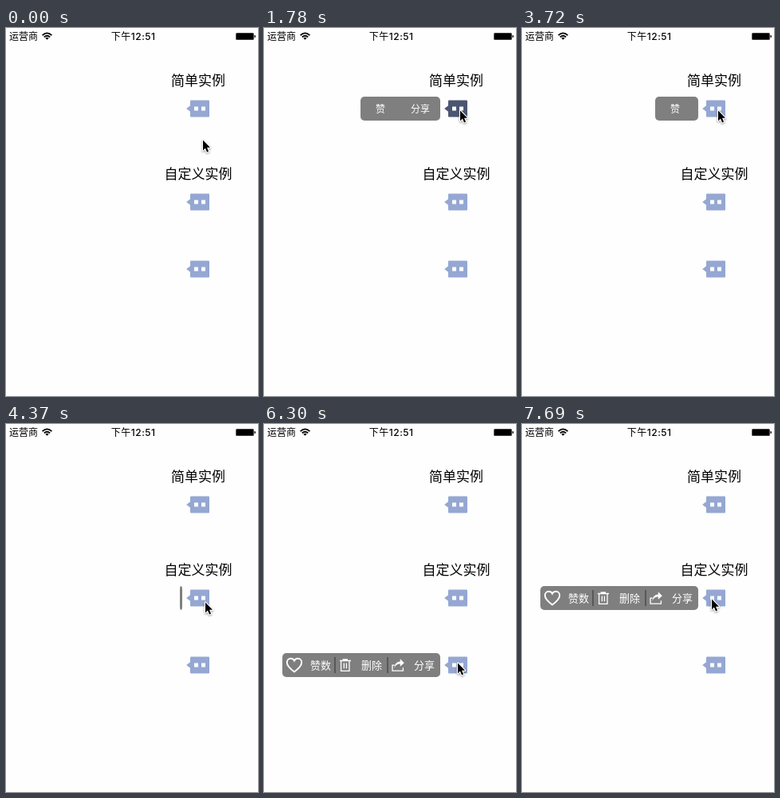
An HTML page for the animation above (7.99 s loop, 316 by 461 pixels).

```html
<!DOCTYPE html>
<html lang="zh-CN">
<head>
<meta charset="utf-8">
<title>弹出菜单</title>
<style>
  html, body { margin: 0; width: 100%; height: 100%; overflow: hidden; background: #fefefe; }
  body { position: relative; font-family: Inter, "Noto Sans CJK SC", "Noto Sans CJK", sans-serif; }
  svg { position: absolute; left: 0; top: 0; display: block; }
  text { text-anchor: middle; }
  .title { font-size: 17px; }
  .status { font-size: 12px; }
  .bubble { fill: #95a7d2; }
  .bubble.pressed { fill: #4b5672; }
  .menu {
    position: absolute; right: calc(100% - 221px); width: 0; height: 30px;
    overflow: hidden; background: #7f7f7f; border-radius: min(50%, 5px) / 5px;
  }
  .small, .large { fill: #fff; }
  .small { font-size: 12px; font-weight: 500; }
  .large { font-size: 13px; }
  .icon { fill: none; stroke: #fff; stroke-width: 1.3; }
  .heart { stroke-width: 1.9; }
  .solid { fill: #fff; }
  .divider { stroke: #484848; stroke-width: 1.4; }
  #cursor {
    stroke: #fff; stroke-width: 2.4; stroke-linejoin: round; paint-order: stroke;
    filter: drop-shadow(0 1px 1px rgba(0, 0, 0, .4));
  }
</style>
</head>
<body>
<svg width="316" height="461">
  <defs>
    <g id="bubble">
      <path d="M-14.8 0L-10 -3.8V3.8Z"/>
      <rect x="-10" y="-10.5" width="24" height="21" rx="1"/>
      <path fill="#fff" d="M-5 -2.5h5v5h-5zM4 -2.5h5v5h-5z"/>
    </g>
    <g id="actions">
      <path class="icon heart" d="M15 23.5C9 19 5.8 16 5.8 11.8C5.8 8.6 8 6.8 10.4 6.8C12.6 6.8 14.2 8 15 9.6C15.8 8 17.4 6.8 19.6 6.8C22 6.8 24.2 8.6 24.2 11.8C24.2 16 21 19 15 23.5Z"/>
      <text class="large" x="48" y="20">赞数</text>
      <path class="divider" d="M66 5V25M132 5V25"/>
      <path class="icon" d="M72 9.5H86M76.3 9.3V8H81.3V9.3M73.6 9.8V22.3H84V9.8M77.3 12.5V19.3M80.4 12.5V19.3"/>
      <text class="large" x="112" y="20">删除</text>
      <path class="icon" d="M140.8 15.2H138V22.2H151.4V18.2"/>
      <path class="solid" d="M140.5 18.7C141 13 144 10.8 147.8 10.6V7.3L152.8 12.2L147.8 16.8V13.6C144.5 13.4 142 15 140.5 18.7Z"/>
      <text class="large" x="178" y="20">分享</text>
    </g>
  </defs>

  <g class="status">
    <text x="22" y="14.5">运营商</text>
    <text x="159.7" y="14.5" font-weight="500" letter-spacing=".5">下午12:51</text>
  </g>
  <g fill="none" stroke="#000" stroke-width="1.8">
    <path d="M45.6 9.2Q51.5 3.6 57.4 9.2M47.8 11.4Q51.5 8 55.2 11.4"/>
    <path fill="#000" stroke="none" d="M51.5 14.8L49.3 12.6Q51.5 10.9 53.7 12.6Z"/>
  </g>
  <rect x="288" y="6" width="23" height="9" rx="1.5" fill="#555"/>
  <rect x="289" y="6.8" width="21" height="7.4" rx=".7"/>
  <path d="M311.5 8.7Q313 9 313 10.5T311.5 12.3Z"/>

  <text class="title" x="241" y="72">简单实例</text>
  <text class="title" x="241" y="189">自定义实例</text>
  <use href="#bubble" class="bubble" x="241" y="101"/>
  <use href="#bubble" class="bubble" x="241" y="218"/>
  <use href="#bubble" class="bubble" x="241" y="302"/>
</svg>

<div class="menu" style="top:86px" data-width="100">
  <svg width="100" height="30">
    <text class="small" x="25" y="19.5">赞</text>
    <text class="small" x="75" y="19.5">分享</text>
  </svg>
</div>
<div class="menu" style="top:203px" data-width="198">
  <svg width="198" height="30"><use href="#actions"/></svg>
</div>
<div class="menu" style="top:287px" data-width="198">
  <svg width="198" height="30"><use href="#actions"/></svg>
</div>

<svg width="316" height="461">
  <path id="cursor" d="M0 .5V13.4L2.9 10.6L5 15.4L7.1 14.5L5 9.8H9Z"/>
</svg>

<script>
const LOOP = 7990, TICK = 60, SLIDE = 300, LEAD = 22;
const bubbles = document.querySelectorAll(".bubble");
const menus = document.querySelectorAll(".menu");
const cursor = document.getElementById("cursor");

// Each menu alternately opens and closes at these times.
const toggles = [[400, 1890, 2590, 3600], [4370, 6000, 7390], [6000, 7390]];

// Press intervals per bubble.
const presses = [
  [[300, 400], [1780, 1890], [2490, 2590], [3490, 3600]],
  [[4310, 4370], [7220, 7330]],
  [[5950, 6000]]
];

const moves = [
  { at: 60, step: 60, count: 4, points: [[247, 140], [249, 128], [247, 110], [246, 103]] },
  { at: 3960, step: 60, count: 6, points: [[246, 103], [257, 150], [258, 205], [253, 228], [250, 223]] },
  { at: 5150, step: 74, count: 11, points: [[250, 223], [250, 252], [250, 280], [243, 299]] },
  { at: 6600, step: 56, count: 9, points: [[243, 299], [231, 268], [229, 236], [238, 219]] }
];

const ease = x => x * x * (3 - 2 * x);

function openness(times, t) {
  const past = times.filter(time => time <= t);
  if (!past.length) return 0;
  const tick = Math.floor((t - past[past.length - 1]) / TICK);
  const p = ease(Math.min(1, (LEAD + tick * TICK) / SLIDE));
  return past.length % 2 ? p : 1 - p;
}

function along(points, u) {
  const s = u * (points.length - 1);
  const i = Math.min(Math.floor(s), points.length - 2);
  return points[i].map((a, k) => a + (points[i + 1][k] - a) * (s - i));
}

function cursorAt(t) {
  const move = moves.filter(m => m.at <= t).pop();
  if (!move) return moves[0].points[0];
  const done = Math.floor((t - move.at) / move.step) + 1;
  return along(move.points, Math.min(1, done / move.count));
}

function draw(now) {
  const t = now % LOOP;
  menus.forEach((menu, i) => {
    menu.style.width = menu.dataset.width * openness(toggles[i], t) + "px";
  });
  bubbles.forEach((bubble, i) => {
    bubble.classList.toggle("pressed", presses[i].some(([a, b]) => t >= a && t < b));
  });
  cursor.setAttribute("transform", `translate(${cursorAt(t).map(Math.round)})`);
  requestAnimationFrame(draw);
}
draw(performance.now());
</script>
</body>
</html>
```
